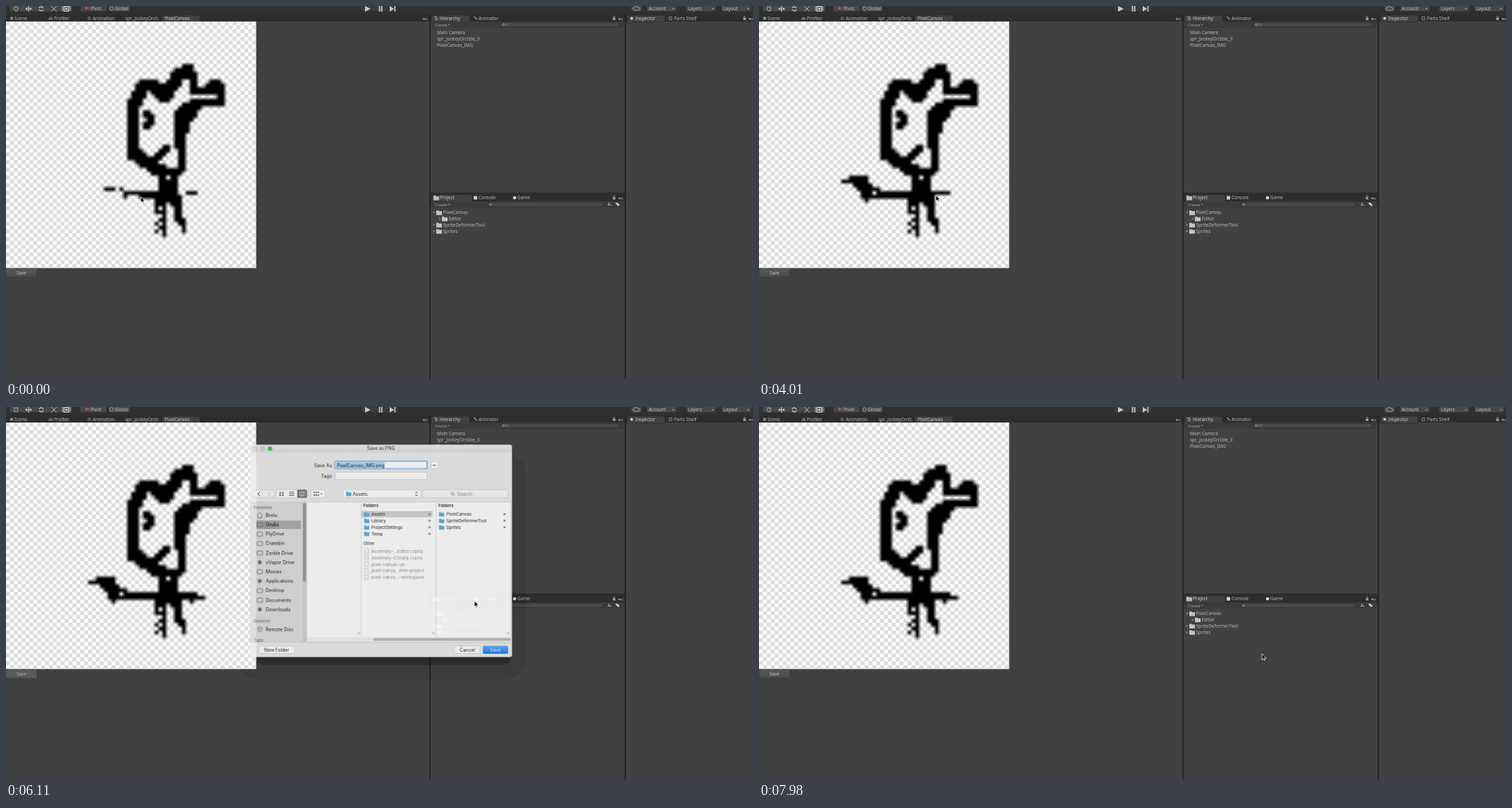
An HTML page with a canvas that plays this animation: 1059 by 529 pixels, repeating every 8 s.

```html
<!DOCTYPE html>
<html lang="en">
<head>
<meta charset="utf-8">
<title>Pixel canvas</title>
<style>
html, body { margin: 0; width: 100%; height: 100%; overflow: hidden; background: #414141; }
canvas { display: block; }
</style>
</head>
<body>
<canvas id="stage" width="1059" height="529"></canvas>
<script>
const W = 1059, H = 529, LOOP = 8000;
const layer = (w, h) => Object.assign(document.createElement('canvas'), { width: w, height: h });
const stage = document.getElementById('stage').getContext('2d');
const EDITOR = '"Noto Sans", "Open Sans", sans-serif';
const DIALOG = 'Inter, Roboto, sans-serif';
let g = stage;

function box(x, y, w, h, fill, r = 0, line) {
  g.beginPath();
  g.roundRect(x, y, w, h, r);
  if (fill) { g.fillStyle = fill; g.fill(); }
  if (line) { g.strokeStyle = line; g.lineWidth = 0.7; g.stroke(); }
}
function shade(y, h, top, bottom) {
  const s = g.createLinearGradient(0, y, 0, y + h);
  s.addColorStop(0, top);
  s.addColorStop(1, bottom);
  return s;
}
function text(s, x, y, color, size = 6.4, font = EDITOR, align = 'left', weight = 400) {
  g.font = `${weight} ${size}px ${font}`;
  g.textAlign = align;
  g.fillStyle = color;
  g.fillText(s, x, y + size * 0.36);
}
function shape(path, x, y, fill, line, width = 0.8) {
  const p = new Path2D(path);
  g.save();
  g.translate(x, y);
  if (fill) { g.fillStyle = fill; g.fill(p); }
  if (line) { g.strokeStyle = line; g.lineWidth = width; g.stroke(p); }
  g.restore();
}
const dot = (x, y, r, fill, line) => box(x - r, y - r, 2 * r, 2 * r, fill, r, line);
const folder = (x, y, fill) => shape('M-4-3h3l1 1h4v5.5h-8z', x, y, fill);
const RIGHT = 'M-1.5-2L2 0L-1.5 2z', DOWN = 'M-1.5-.7h3L0 1z';

// Editor window
const label = (s, x, y, color = '#b8b8b8') => text(s, x, y, color);
function tab(s, x, y, w, textX) {
  box(x, y - 4.5, w, 10, '#414141', [2, 2, 0, 0], '#2a2a2a');
  label(s, textX, y, '#d0d0d0');
}
function paneMenu(x, y, locked) {
  shape('M-2.5-.7h3L-1 1zM1-.7h3M1 1h3', x - 1.5, y + 0.5, '#aaa', '#aaa', 0.7);
  if (!locked) return;
  box(x - 11.7, y - 1, 3.5, 2.8, '#aaa');
  shape('M-1 0v-1.4a1 1 0 0 1 2 0V0', x - 10, y - 1, null, '#aaa');
}
function toolbar() {
  box(0, 0, W, 12, '#303030');
  const button = (x, w, fill = '#484848') => box(x, -4, w, 12, fill, 2, '#292929');
  const menu = (s, x, w) => {
    button(x, w);
    label(s, x + 3, 3.5, '#c4c4c4');
    shape(DOWN, x + w - 5, 4, '#bbb');
  };
  button(5, 89);
  button(78, 15, '#747474');
  shape('M-2-1l2 4h3l1-5M-1-1v-3M1-1v-3M3-1v-3', 13, 4, null, '#bbb');
  shape('M-4 0H4M0-4V4M-4 0l1.5-1.5M-4 0l1.5 1.5M4 0L2.5-1.5M4 0L2.5 1.5', 32, 4, null, '#ccc', 1.2);
  shape('M-3-1a3 3 0 0 1 5-1l1 1M3 1a3 3 0 0 1-5 1l-1-1', 50, 4, null, '#ccc', 1.2);
  shape('M-4-4L4 4M4-4L-4 4', 68, 4, '#ccc', '#ccc');
  box(82, 0.5, 7, 7, null, 0, '#fff');
  dot(85.5, 4, 1, '#fff');
  button(105, 38);
  button(145, 31);
  shape('M-3 1h6M-1-1v4', 115, 2, null, '#d66', 1.2);
  label('Pivot', 120, 3.5, '#c4c4c4');
  dot(149.5, 3.5, 2.5, null, '#bbb');
  label('Global', 154, 3.5, '#c4c4c4');
  button(503, 54, '#3b3b3b');
  shape('M-3-4L5 0L-3 4z', 512, 4, '#c8c8c8');
  shape('M-1.5-4v8M1.7-4v8', 531, 4, null, '#c8c8c8', 1.8);
  shape('M-4-4L2 0L-4 4zM2.5-4h1.6v8H2.5z', 548, 4, '#c8c8c8');
  button(886, 16);
  shape('M-3 2a2 2 0 0 1 0-4a3 3 0 0 1 5 0a2 2 0 0 1 1 4z', 894, 4, null, '#bbb');
  menu('Account', 908, 43);
  menu('Layers', 964, 43);
  menu('Layout', 1014, 43);
}
function searchBar(y, x, right) {
  box(602, y - 4.5, 275, 9, '#3b3b3b');
  text('Create', 608, y, '#aaa', 5.7);
  shape(DOWN, 628, y, '#999');
  box(x, y - 3, right - x, 6, '#494949', 3, '#303030');
  dot(x + 4, y, 1.4, null, '#aaa');
}
function treeRow(s, indent, y, arrow) {
  shape(arrow, 607 + indent, y, '#777');
  folder(614 + indent, y, '#c4c4c4');
  label(s, 619.5 + indent, y);
}
function editor() {
  box(0, 0, W, H, '#414141');
  toolbar();
  box(0, 12, W, 10, '#2d2d2d');
  box(602, 264.5, 275, 12.5, '#2d2d2d');
  [600, 877].forEach(x => box(x, 12, 2, H, '#252525'));
  label('Scene', 12, 17.5);
  label('Profiler', 68, 17.5);
  label('Animation', 123, 17.5);
  label('spr_JockeyOrcIc', 169, 17.5);
  tab('PixelCanvas', 221, 17.5, 54, 225);
  tab('Hierarchy', 603, 17.5, 54, 615);
  label('Animator', 670, 17.5);
  tab('Inspector', 881, 17.5, 53, 892);
  label('Parts Shelf', 947, 17.5);
  tab('Project', 604, 272, 57, 615);
  label('Console', 670, 272);
  label('Game', 725, 272);
  shape('M-2-1h4M-2 1h4M-1-2v4M1-2v4', 8, 17.5, null, '#bbb');
  shape('M-2 2v-2M0 2v-4M2 2v-3', 63, 17.5, null, '#bbb', 1);
  dot(118, 17.5, 1.8, null, '#bbb');
  shape('M-2-2h4M-1 0h4M-1 2h4', 609, 17.5, null, '#bbb');
  shape('M-2-2h2v2h2v2', 665, 17.5, null, '#bbb');
  dot(887, 17.5, 2, '#ccc');
  box(940, 15.5, 4, 4, null, 0, '#aaa');
  folder(610, 272, '#bbb');
  box(663, 269.5, 5, 5, '#ccc');
  dot(721, 272, 2.3, '#ddd');
  paneMenu(595, 18);
  paneMenu(872, 18, true);
  paneMenu(872, 272.5, true);
  paneMenu(1057, 18, true);
  searchBar(26.5, 701, 869);
  searchBar(281.5, 683, 846);
  text('All', 707, 26.5, '#777', 5.5);
  shape('M-2 1h2M0-2v2M1 1h2M-1-1l1-1', 855, 281.5, null, '#ccc', 1.2);
  shape('M-3-2h3l3 3l-2 2l-4-4z', 867, 281, '#ccc');
  ['Main Camera', 'spr_JockeyOrcIdle_3', 'PixelCanvas_IMG'].forEach((s, i) => label(s, 611, 38 + i * 8.85));
  treeRow('PixelCanvas', 0, 293, 'M-2-1.5h4L0 2z');
  treeRow('Editor', 8, 301.8, RIGHT);
  treeRow('SpriteDeformerTool', 0, 310.6, RIGHT);
  treeRow('Sprites', 0, 319.4, RIGHT);
}

// Drawing surface of 64 by 64 cells, painted with square brushes
const N = 64, TOP = 22, PW = 354.5, PH = 349.5, CW = PW / N, CH = PH / N;
const art = layer(N, N), ink = art.getContext('2d');
const stroke = (size, route, from = -1, to = from + 1) =>
  ({ size, from, to, pts: route.split(' ').map(p => p.split(',').map(Number)) });
const figure = [
  stroke(3, '31,33 31,20 32,18 34,15 36,15 39,18 41,15 42,13 45,11'),
  stroke(2, '46,12 47,13 47,17 50,17'),
  stroke(3, '51,16 52,15'),
  stroke(2, '53,15 54,16 54,20 48,20'),
  stroke(3, '47,20'),
  stroke(4, '45,21 43,23 43,25'),
  stroke(3, '43,26 43,30'),
  stroke(2, '44,31 44,37 43,38 38,38'),
  stroke(3, '31,32 33,34 36,36 38,37'),
  stroke(2, '37,35 40,32'),
  stroke(2, '35,23 36,24 36,25 35,26'),
  stroke(5, '39,40'),
  stroke(3, '38,45 38,47'),
  stroke(1, '40,50 40,55'),
  stroke(1, '39,51 38,52 39,53 38,54'),
  stroke(1, '41,45 41,46'),
  stroke(3, '42,45'),
  stroke(2, '43,47 43,50 44,51'),
  stroke(1, '45,52 45,54'),
  stroke(1, '25,43 27,43'),
  stroke(1, '29,43'),
  stroke(1, '30,45 30,44 38,44 38,45 34,45'),
  stroke(1, '46,44 48,44')
];
const live = [
  stroke(1, '34,45 31,45', 79, 80),
  stroke(1, '30,43 28,43', 500, 600),
  stroke(2, '25,41 25,40', 700, 890),
  stroke(1, '28,43 29,43', 1000, 1090),
  stroke(3, '25,41 25,40', 1300, 1500),
  stroke(2, '23,40 24,41', 1600, 1900),
  stroke(1, '25,41 21,41', 2150, 2350),
  stroke(2, '26,43 27,43 27,42', 2450, 2700),
  stroke(1, '26,44 27,46', 2950, 3150),
  stroke(1, '26,45 31,45', 3200, 3400),
  stroke(1, '43,44 46,44', 3770, 3950),
  stroke(1, '44,45 50,45', 4050, 4400),
  stroke(1, '47,46', 4450, 4500)
];
const lerp = (a, b, f) => a + (b - a) * f;
function paint({ size, pts, from, to }, t) {
  if (t < from) return;
  const done = Math.min(1, (t - from) / (to - from)) * Math.max(1, pts.length - 1);
  ink.fillRect(...pts[0], size, size);
  pts.slice(1).forEach(([x, y], i) => {
    const [px, py] = pts[i], n = Math.max(Math.abs(x - px), Math.abs(y - py));
    for (let k = 1; k <= n && i + k / n <= done + 1e-6; k++)
      ink.fillRect(Math.round(lerp(px, x, k / n)), Math.round(lerp(py, y, k / n)), size, size);
  });
}
function drawing(t) {
  ink.clearRect(0, 0, N, N);
  figure.forEach(s => paint(s, t));
  live.forEach(s => paint(s, t));
  ink.clearRect(41, 40, 1, 1);
  ink.clearRect(39, 48, 1, 1);
  g.drawImage(art, 0, TOP, PW, PH);
}
function checker() {
  box(0, TOP, PW, PH, '#fff');
  g.fillStyle = '#dcdcdc';
  for (let y = 0; y < N; y++)
    for (let x = y % 2; x < N; x += 2) g.fillRect(x * CW, TOP + y * CH, CW, CH);
}
function saveButton(down) {
  box(0, 372, 44, 13, down ? '#585a5c' : shade(372, 13, '#5a5a5a', '#484848'), 2, '#333');
  text('Save', 22, 378.5, down ? '#b4b4b4' : '#c8c8c8', 6.4, EDITOR, 'center');
}

// Save dialog
const favorites = ['Brelu', 'Ondix', 'PlyDrive', 'Cratebin', 'Zorble Drive', 'oVapor Drive', 'Movies',
  'Applications', 'Desktop', 'Documents', 'Downloads'];
const projects = ['erscore', 'me-jam', 'onsole', '-lobotomy', 'ncon...l Weapon', 'lo', 'et', 'r', 'ubashing',
  'eraStuff', 'ade', 'oF', 'ectedworlds', 'lt-project', 'ation', 'riments', 'er', 'the Frog', ''];
const files = ['Assembly-...Editor.csproj', 'Assembly-CSharp.csproj', 'pixel-canvas.sln',
  'pixel-canva...lime-project', 'pixel-canva...-workspace'];
const say = (s, x, y, color = '#222', size = 6.6, align = 'left', weight = 400) =>
  text(s, x, y, color, size, DIALOG, align, weight);
const heading = (s, y) => say(s, 340, y, '#707070', 6.4, 'left', 500);
const control = (x, y, w, h, fill = '#fff') => box(x, y, w, h, fill, 2, '#ccc');

function sidebar() {
  box(334, 131, 86, 211, '#dedede');
  heading('Favorites', 138.5);
  box(344, 158.5, 67, 12.5, '#adadad');
  box(344, 158.5, 34, 12.5, '#a2a2a2');
  favorites.forEach((s, i) => {
    const y = 150.2 + i * 14.2, round = /Vapor|App|Down/.test(s);
    if (i === 0) shape('M-4 0L0-4L4 0M-3 0v4h6V0', 349, y, null, '#555');
    else if (round) dot(349, y, 3, '#777');
    else box(345, y - 2.8, 8, 6, null, 0.7, '#555');
    say(s, 358, y, '#252525', 7.1, 'left', i === 1 ? 500 : 400);
  });
  heading('Devices', 310);
  dot(349, 322, 3.5, null, '#555');
  dot(349, 322, 1, '#777');
  say('Remote Disc', 358, 322, '#252525', 7.1);
  heading('Tags', 339);
  box(413, 131, 7, 211, '#d2d2d2');
  box(414, 132, 4.5, 118, '#999', 2);
}
function column(x, rows) {
  say('Folders', x + 1, 136, '#222', 6.3, 'left', 600);
  rows.forEach((s, i) => {
    const y = 148.7 + i * 9.85;
    folder(x + 6, y, '#55b5e8');
    say(s, x + 13, y);
    shape(RIGHT, x + 101, y, '#777');
  });
}
function projectList() {
  g.save();
  g.beginPath();
  g.rect(420.5, 131, 80, 203);
  g.clip();
  projects.forEach((s, i) => {
    const y = 148.7 + i * 9.82;
    say(s, 420, y);
    shape(RIGHT, 491, y, '#777');
  });
  dot(482, 217.6, 2.6, '#3d9bf0');
  box(495.5, 133, 4, 77, '#b5b5b5', 2);
  g.restore();
}
function browser(loaded) {
  box(420, 131, 307, 203, '#fff');
  if (loaded) projectList();
  box(502, 144, 107, 9.6, '#d3d3d3');
  column(504, ['Assets', 'Library', 'ProjectSettings', 'Temp']);
  column(617, ['PixelCanvas', 'SpriteDeformerTool', 'Sprites']);
  say('Other', 505, 192.5, '#444', 6.3, 'left', 500);
  files.forEach((s, i) => {
    const y = 204.5 + i * 9.85;
    box(507, y - 3.5, 5.5, 7, '#fafafa', 0, '#ccc');
    say(s, 517, y, '#8d8d8d');
  });
  [501.5, 614, 727].forEach(x => {
    box(x, 131, 0.7, 203, '#d4d4d4');
    shape('M-1-2v4M1-2v4', x - 3.5, 328, null, '#aaa', 0.7);
  });
  box(420, 334, 307, 7.5, '#f2f2f2');
  box(520, 335.5, 207, 4, '#b8b8b8', 2);
}
function dialogToolbar(loaded) {
  control(341, 112, 30, 12, '#f6f6f6');
  shape('M1-3L-2 0L1 3', 348, 118, null, loaded ? '#bbb' : '#444', 1);
  shape('M-1-3L2 0L-1 3', 363, 118, null, '#bbb', 1);
  control(374, 112, 46, 12);
  box(405.5, 112, 14.5, 12, '#6d6d6d', [0, 2, 2, 0]);
  shape('M-3-1.5h2.3M1-1.5h2.3M-3 2h2.3M1 2h2.3', 381.5, 118, null, '#666', 2.3);
  shape('M-4-2.5h8M-4 0h8M-4 2.5h8', 397, 118, null, '#555', 1);
  shape('M-4-3h8v6h-8zM-1.3-3v6M1.3-3v6', 413, 118, null, '#fff');
  control(426, 112, 21, 12);
  shape('M-4-2h2M-1-2h2M2-2h2M-4 2h2M-1 2h2M2 2h2', 434, 118, null, '#666', 2);
  shape('M-1.5-.7L0 1L1.5-.7', 442, 118, null, '#555');
  control(474, 112, 118, 12);
  folder(483, 118, '#55b5e8');
  say('Assets', 489, 118, '#222', 7);
  shape('M-1.7-1L0-3L1.7-1M-1.7 1L0 3L1.7 1', 585, 118, null, '#444', 0.9);
  control(594, 112, 129, 12, '#f9f9f9');
  dot(639, 117.5, 2, null, '#777');
  shape('M0 0l2 2', 640.5, 119, null, '#777');
  say('Search', 646, 118, '#888', 7);
}
function dialog(loaded) {
  box(334, 44, 395, 320, '#ececec', 4);
  box(334, 44, 395, 12, shade(44, 12, '#ebebeb', '#dedede'), [4, 4, 0, 0]);
  dot(342, 50, 3.2, '#d3d3d3', '#bbb');
  dot(353, 50, 3.2, '#d3d3d3', '#bbb');
  dot(364.5, 50, 3.3, '#28c840');
  say('Save as PNG', 531.5, 50, '#333', 6.9, 'center');
  say('Save As:', 459.5, 75, '#222', 7, 'right');
  say('Tags:', 459.5, 91, '#222', 7, 'right');
  box(461.5, 68, 140, 13, '#7fb1e6', 1.5);
  box(463, 69.5, 137, 10, '#fff');
  box(464, 70, 73, 9, '#b3d5fb');
  say('PixelCanvas_IMG.png', 465, 75, '#222', 7);
  box(462.5, 85.5, 138, 11, '#fff', 0, '#c4c4c4');
  control(607, 69.5, 10.5, 10.5);
  shape('M-2 1L0-1L2 1', 612, 75, null, '#333', 1);
  dialogToolbar(loaded);
  box(334, 130.5, 395, 0.7, '#c8c8c8');
  sidebar();
  browser(loaded);
  box(334, 341.5, 395, 22.5, '#ececec', [0, 0, 4, 4]);
  box(334, 341.5, 395, 0.7, '#cfcfcf');
  control(347.5, 347.5, 54, 11);
  say('New Folder', 374.5, 353, '#222', 7, 'center');
  control(642.5, 347.5, 38, 11);
  say('Cancel', 661.5, 353, '#222', 7, 'center');
  box(685, 347, 38, 12, shade(347, 12, '#62b0fa', '#157dfb'), 2);
  say('Save', 704, 353, '#fff', 7, 'center');
}
function shadow() {
  box(315, 57, 435, 341, 'rgba(0,0,0,.09)', 32);
  box(345, 70, 382, 306, 'rgba(0,0,0,.25)', 10);
}

// The pointer leads each brush stroke, then visits the buttons
const brushTip = (t, [x, y], size) => ({ t, x: (x + size / 2) * CW, y: TOP + (y + size / 2) * CH });
const stop = (t, x, y) => ({ t, x, y });
const track = [
  ...live.flatMap(s => [brushTip(s.from, s.pts[0], s.size), brushTip(s.to, s.pts.at(-1), s.size)]),
  stop(4630, 283, 275), stop(5150, 98, 393), stop(5330, 62, 393), stop(5630, 24, 380),
  stop(6110, 664, 275), stop(6260, 664, 275), stop(6440, 653, 179), stop(6640, 653, 179),
  stop(7060, 700, 349), stop(7210, 705, 354), stop(7860, 705, 354), stop(7980, 713, 350)
];
function pointer(t) {
  const next = track.find(k => k.t > t) || track.at(-1);
  const last = track.findLast(k => k.t <= t) || track[0];
  const f = next === last ? 0 : Math.max(0, (t - last.t) / (next.t - last.t));
  shape('M0 0V8.4L2 6.7L3.2 9.4L4.6 8.8L3.4 6.2H6z', lerp(last.x, next.x, f), lerp(last.y, next.y, f), '#000', '#fff');
}

function cached(draw) {
  const c = layer(W, H);
  g = c.getContext('2d');
  draw();
  return c;
}
const base = cached(editor), paper = cached(checker), shade3d = cached(shadow);
const emptySheet = cached(() => dialog(false)), fullSheet = cached(() => dialog(true));
g = stage;

function render(t) {
  const opening = t < 6260, open = t >= 6110 && t < 7980;
  const show = (sheet, alpha) => {
    const k = opening ? 0.941 : 1;
    g.globalAlpha = alpha;
    g.drawImage(sheet, 531.5 * (1 - k), 204 * (1 - k), W * k, H * k);
    g.globalAlpha = 1;
  };
  const fade = t >= 7860 ? 0.5 : 1;
  g.drawImage(base, 0, 0);
  saveButton(t >= 5630 && opening);
  if (open) show(shade3d, fade);
  g.drawImage(paper, 0, 0);
  drawing(t);
  if (open) show(t < 6640 ? emptySheet : fullSheet, opening ? 0.91 : fade);
  pointer(t);
}
const start = performance.now();
function tick() {
  render((performance.now() - start) % LOOP);
  requestAnimationFrame(tick);
}
tick();
</script>
</body>
</html>
```
